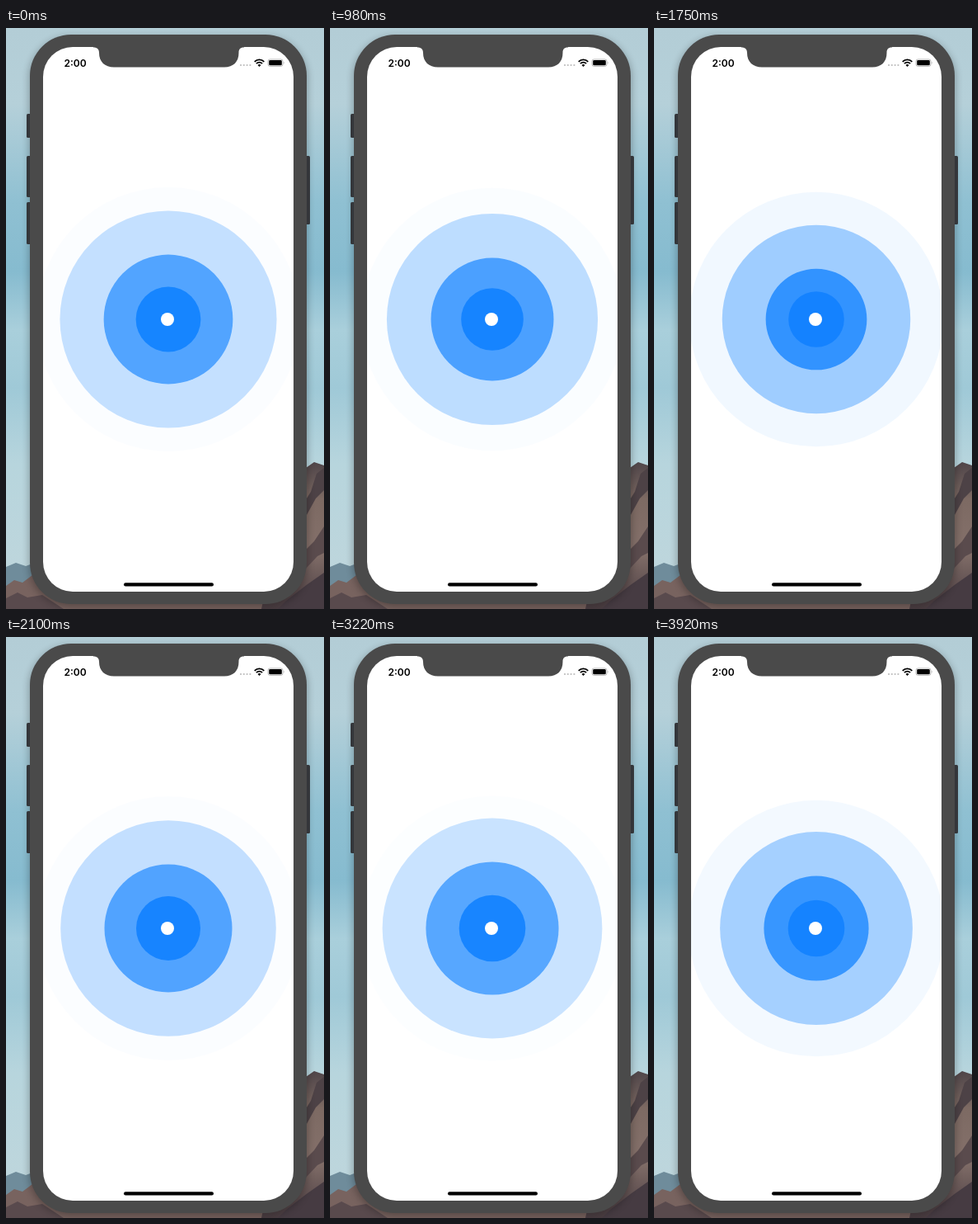
Recreate the animation shown at these times as an HTML page. Size 386 px wide and 704 px high, loop 3990 ms.

```html
<!DOCTYPE html>
<html lang="en">
<head>
<meta charset="utf-8">
<title>Pulse</title>
<style>
  html, body { margin: 0; width: 100%; height: 100%; overflow: hidden; }
  svg { display: block; width: 386px; height: 704px; }
  text { font: 600 12px Inter, "Liberation Sans", sans-serif; }
</style>
</head>
<body>
<svg viewBox="0 0 386 704">
  <defs>
    <linearGradient id="sky" x2="0" y2="1">
      <stop offset="0" stop-color="#b3cdd6"/>
      <stop offset=".13" stop-color="#b5d0d9"/>
      <stop offset=".3" stop-color="#8fc0d2"/>
      <stop offset=".42" stop-color="#86bbcf"/>
      <stop offset=".52" stop-color="#a9cfdb"/>
      <stop offset=".62" stop-color="#9fc9d7"/>
      <stop offset=".75" stop-color="#b7d5dd"/>
      <stop offset="1" stop-color="#c0d6dc"/>
    </linearGradient>
    <linearGradient id="rock" x2="0" y2="1">
      <stop offset="0" stop-color="#4f4549"/>
      <stop offset=".25" stop-color="#7d6a63"/>
      <stop offset=".6" stop-color="#84706a"/>
      <stop offset="1" stop-color="#4a3d42"/>
    </linearGradient>
    <filter id="soft" x="-20%" y="-20%" width="140%" height="140%">
      <feGaussianBlur stdDeviation="5"/>
    </filter>
    <clipPath id="screen"><rect x="45" y="23" width="304" height="660" rx="36"/></clipPath>
  </defs>

  <!-- wallpaper -->
  <rect width="386" height="704" fill="url(#sky)"/>
  <path d="M0 653L12 648 24 652 40 646V704H0Z" fill="#6f8c9b"/>
  <path d="M0 676L10 669 20 672 36 660 60 680H386V704H0Z" fill="#78635f"/>
  <path d="M0 691L14 684 26 690 44 687 70 704H0Z" fill="#594a4d"/>
  <path d="M340 560L364 533 374 526 386 530V704H310Z" fill="url(#rock)"/>
  <path d="M386 533L377 540 370 562 365 570V590L376 570 386 560Z" fill="#4d4246"/>
  <path d="M386 604L374 622 364 632V655L378 640 386 636Z" fill="#5a4b4d"/>
  <path d="M386 660L366 674 340 694 330 704H386Z" fill="#463b42"/>

  <!-- phone -->
  <rect x="28" y="11" width="338" height="690" rx="50" opacity=".28" filter="url(#soft)"/>
  <g fill="#34363a">
    <rect x="25" y="104" width="7" height="29" rx="1.5"/>
    <rect x="25" y="155" width="7" height="50" rx="1.5"/>
    <rect x="25" y="211" width="7" height="51" rx="1.5"/>
    <rect x="362" y="155" width="7" height="83" rx="1.5"/>
  </g>
  <rect x="29" y="8" width="336" height="690" rx="50" fill="#4a4a4a"/>
  <g clip-path="url(#screen)">
    <rect x="45" y="23" width="304" height="660" fill="#fff"/>
    <g id="rings" fill="#1483ff"></g>
    <circle cx="196" cy="353" r="8" fill="#fff"/>
  </g>
  <path d="M106 22H289V23.5C284 23.5 282.500 26 282.500 30C282.500 41 276 47.500 265 47.500H131C120 47.500 113 41 113 30C113 26 111 23.500 106 23.500Z" fill="#4a4a4a"/>

  <!-- status bar -->
  <text x="70.500" y="46.500">2:00</text>
  <g fill="#bcbcbc">
    <circle cx="285" cy="45" r="1.100"/>
    <circle cx="288.800" cy="45" r="1.100"/>
    <circle cx="292.600" cy="45" r="1.100"/>
    <circle cx="296.400" cy="45" r="1.100"/>
  </g>
  <g fill="none" stroke="#000" stroke-width="1.800">
    <path d="M301.700 40.800A8.200 8.200 0 0 1 313.300 40.800"/>
    <path d="M303.900 43.200A5 5 0 0 1 311.100 43.200"/>
  </g>
  <path d="M305.500 44.900A2.900 2.900 0 0 1 309.500 44.900L307.500 47Z"/>
  <rect x="318" y="38" width="18" height="8.400" rx="2.400" fill="none" stroke="#a5a5a5" stroke-width=".8"/>
  <rect x="319.200" y="39.100" width="15.600" height="6.200" rx="1.400"/>
  <path d="M337 40.800Q338.400 42.200 337 43.600Z" fill="#a5a5a5"/>
  <rect x="143" y="672.300" width="109" height="4.200" rx="2.100"/>
</svg>
<script>
  const LOOP = 3990, STEP = 70;
  const CYCLE = 4235, PHASE = 0.1645, COUNT = 4;
  const R_MIN = 32.3, R_MAX = 162;

  const group = document.getElementById('rings');
  const rings = Array.from({ length: COUNT }, () => {
    const ring = document.createElementNS(group.namespaceURI, 'circle');
    ring.setAttribute('cx', 197);
    ring.setAttribute('cy', 353);
    return group.appendChild(ring);
  });

  // cubic-bezier(.42, 0, .58, 1)
  function easeInOut(x) {
    let lo = 0, hi = 1, s = x;
    for (let i = 0; i < 24; i++) {
      s = (lo + hi) / 2;
      const bx = 1.26 * s * (1 - s) ** 2 + 1.74 * s * s * (1 - s) + s ** 3;
      if (bx < x) lo = s; else hi = s;
    }
    return s * s * (3 - 2 * s);
  }

  function draw(ms) {
    const t = Math.floor((ms % LOOP) / STEP) * STEP;
    rings.forEach((ring, i) => {
      const p = easeInOut((t / CYCLE + PHASE + i / COUNT) % 1);
      ring.setAttribute('r', R_MIN + (R_MAX - R_MIN) * p);
      ring.setAttribute('opacity', 1 - p);
    });
  }

  const start = performance.now();
  function tick() {
    draw(performance.now() - start);
    requestAnimationFrame(tick);
  }
  tick();
</script>
</body>
</html>
```
